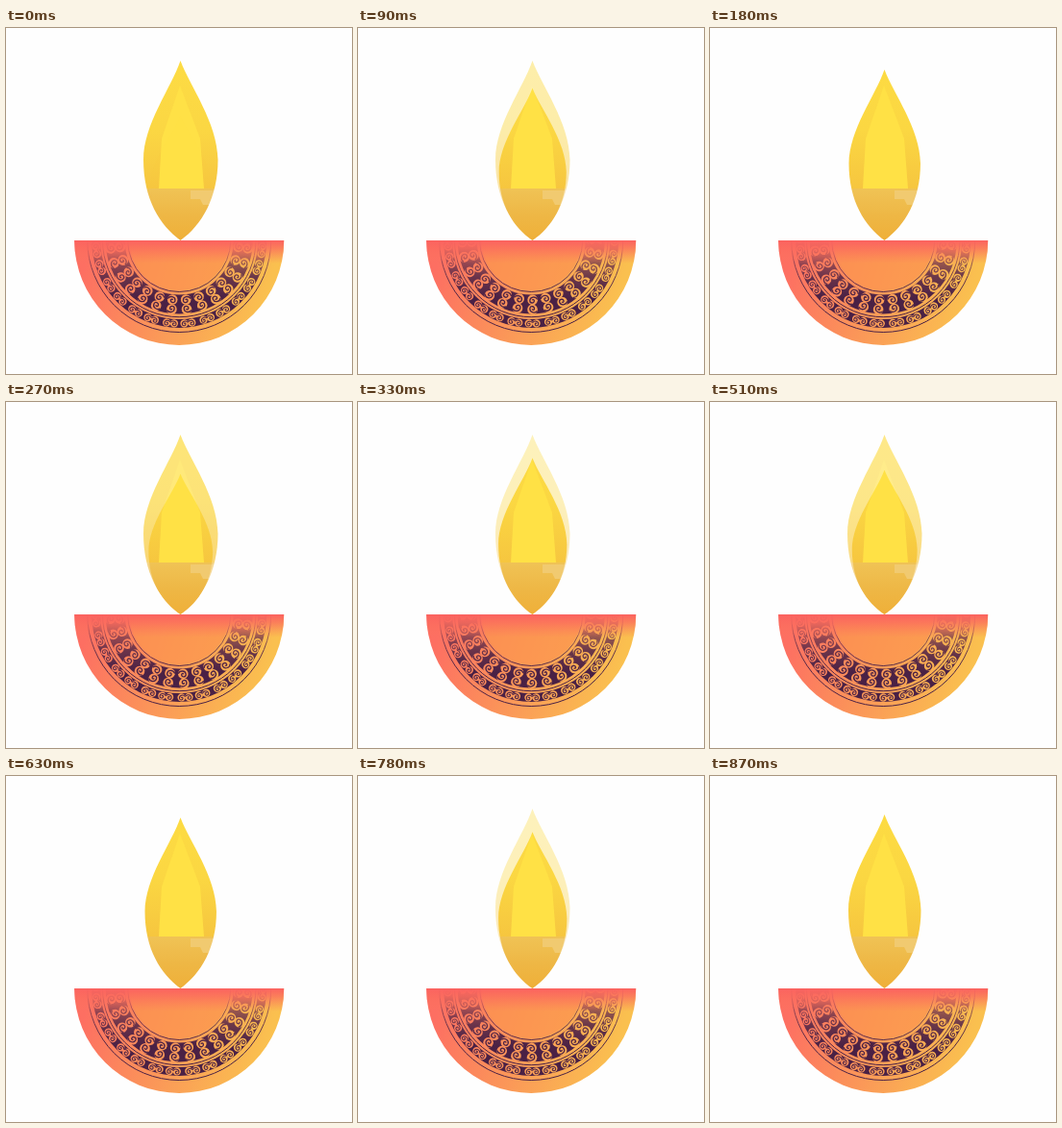
Animation of 360x360 px, one loop 0.9 s. Source, as an HTML page without scripts:

```html
<!DOCTYPE html>
<html lang="en">
<head>
<meta charset="utf-8">
<title>Diya</title>
<style>
  html, body { margin: 0; width: 100%; height: 100%; overflow: hidden; background: #fefefe; }
  svg { display: block; width: 100vw; height: 100vh; }
  .grow { transform-origin: 181.5px 221px; animation: grow 225ms linear infinite; }
  .fade { animation: fade 225ms linear infinite; }
  .appear { animation: appear 225ms linear infinite; }
  .wheel { animation: turn 450ms steps(15) infinite; }
  @keyframes grow {
    0%   { transform: scale(.8, .69); }
    20%  { transform: scale(.86, .78); }
    47%  { transform: scale(.92, .87); }
    80%  { transform: scale(.96, .95); }
    100% { transform: scale(1); }
  }
  @keyframes fade {
    0%   { opacity: 1; }
    20%  { opacity: .72; }
    47%  { opacity: .36; }
    80%, 100% { opacity: 0; }
  }
  @keyframes appear { 0% { opacity: 0; } 20%, 100% { opacity: 1; } }
  /* One ornament pair out of fourteen */
  @keyframes turn { to { transform: rotate(25.714deg); } }
</style>
</head>
<body>
<svg viewBox="0 0 360 360">
  <defs>
    <path id="flame" d="M181.500 34C191 60 220 98 220.500 137C220.500 176 204 205 181.500 221C160 205 143 178 143 137C143 100 172 62 181.500 34Z"/>
    <clipPath id="full"><use href="#flame"/></clipPath>
    <clipPath id="growing"><use href="#flame" class="grow"/></clipPath>

    <linearGradient id="yellow" x2="0" y2="1">
      <stop stop-color="#fddc43"/><stop offset=".55" stop-color="#fbd742"/><stop offset="1" stop-color="#f6c63f"/>
    </linearGradient>
    <linearGradient id="amber" x2="0" y2="1">
      <stop stop-color="#f0c355"/><stop offset=".5" stop-color="#eeb745"/><stop offset="1" stop-color="#efaf38"/>
    </linearGradient>
    <linearGradient id="clay" gradientUnits="userSpaceOnUse" x1="-95" y1="15" x2="85" y2="75">
      <stop stop-color="#fd6f62"/><stop offset=".45" stop-color="#fb9459"/><stop offset="1" stop-color="#fac04f"/>
    </linearGradient>
    <linearGradient id="rim" x2="0" y2="1">
      <stop stop-color="#fb6260"/><stop offset=".35" stop-color="#fb6a5e" stop-opacity=".75"/>
      <stop offset="1" stop-color="#fb755c" stop-opacity="0"/>
    </linearGradient>
    <linearGradient id="ink" gradientUnits="userSpaceOnUse" x1="0" y1="5" x2="0" y2="60">
      <stop stop-color="#8a3f52" stop-opacity=".5"/><stop offset=".6" stop-color="#5a2a48" stop-opacity=".9"/>
      <stop offset="1" stop-color="#4a2145"/>
    </linearGradient>

    <g id="fire">
      <path fill="url(#yellow)" d="M140 30h82v137h-82z"/>
      <path fill="#ffe145" d="M181 60L202 115L206 167H159L162 115Z"/>
      <path fill="url(#amber)" d="M140 167h82v56h-82z"/>
      <path fill="#f1ca70" d="M192 169h25l-4 15h-8l-3-6h-10z"/>
    </g>

    <!-- Black discs cut the ink away, white spirals keep it -->
    <g id="curl">
      <circle r="5.300" fill="#000"/>
      <path fill="none" stroke="#fff" stroke-width="1.300" d="M5-1C2.500-4.500-3-3-2.800 1C-2.500 4 2 3.800 1.800 .8C1.700-.6 0-.8-.4 .5"/>
    </g>
    <g id="scroll">
      <use href="#curl" transform="translate(7 61.500)"/>
      <use href="#curl" transform="translate(7.800 71.500) scale(1 -1)"/>
      <use href="#curl" transform="rotate(-3.500) translate(0 86.500) scale(.78)"/>
      <use href="#curl" transform="rotate(-8.700) translate(0 86.500) scale(-.78 .78)"/>
    </g>
    <g id="pair"><use href="#scroll"/><use href="#scroll" transform="scale(-1 1)"/></g>
    <g id="two"><use href="#pair"/><use href="#pair" transform="rotate(25.714)"/></g>
    <g id="four"><use href="#two"/><use href="#two" transform="rotate(51.429)"/></g>
    <g id="eight"><use href="#four"/><use href="#four" transform="rotate(102.857)"/></g>

    <mask id="lace" maskUnits="userSpaceOnUse" x="-110" y="0" width="220" height="110">
      <g fill="none" stroke="#fff">
        <circle r="66.500" stroke-width="20"/>
        <circle r="86.500" stroke-width="9"/>
      </g>
      <g class="wheel">
        <use href="#eight" transform="rotate(-102.857)"/>
        <use href="#eight" transform="rotate(77.143)"/>
      </g>
      <g fill="none" stroke="#fff">
        <circle r="53.500"/><circle r="79.700"/><circle r="95.500"/>
      </g>
    </mask>
    <path id="bowl" d="M-109 0H109A109 109 0 0 1-109 0Z"/>
  </defs>

  <g class="fade"><use href="#fire" clip-path="url(#full)"/></g>
  <g class="appear"><use href="#fire" clip-path="url(#growing)"/></g>

  <g transform="translate(180.200 221)">
    <use href="#bowl" fill="url(#clay)"/>
    <circle r="52" fill="#fd964f" opacity=".7" clip-path="inset(50% 0 0)"/>
    <use href="#bowl" fill="url(#ink)" mask="url(#lace)"/>
    <path fill="url(#rim)" d="M-109 0h218q0 12-2.500 24h-213q-2.500-12-2.500-24z"/>
  </g>
</svg>
</body>
</html>
```
